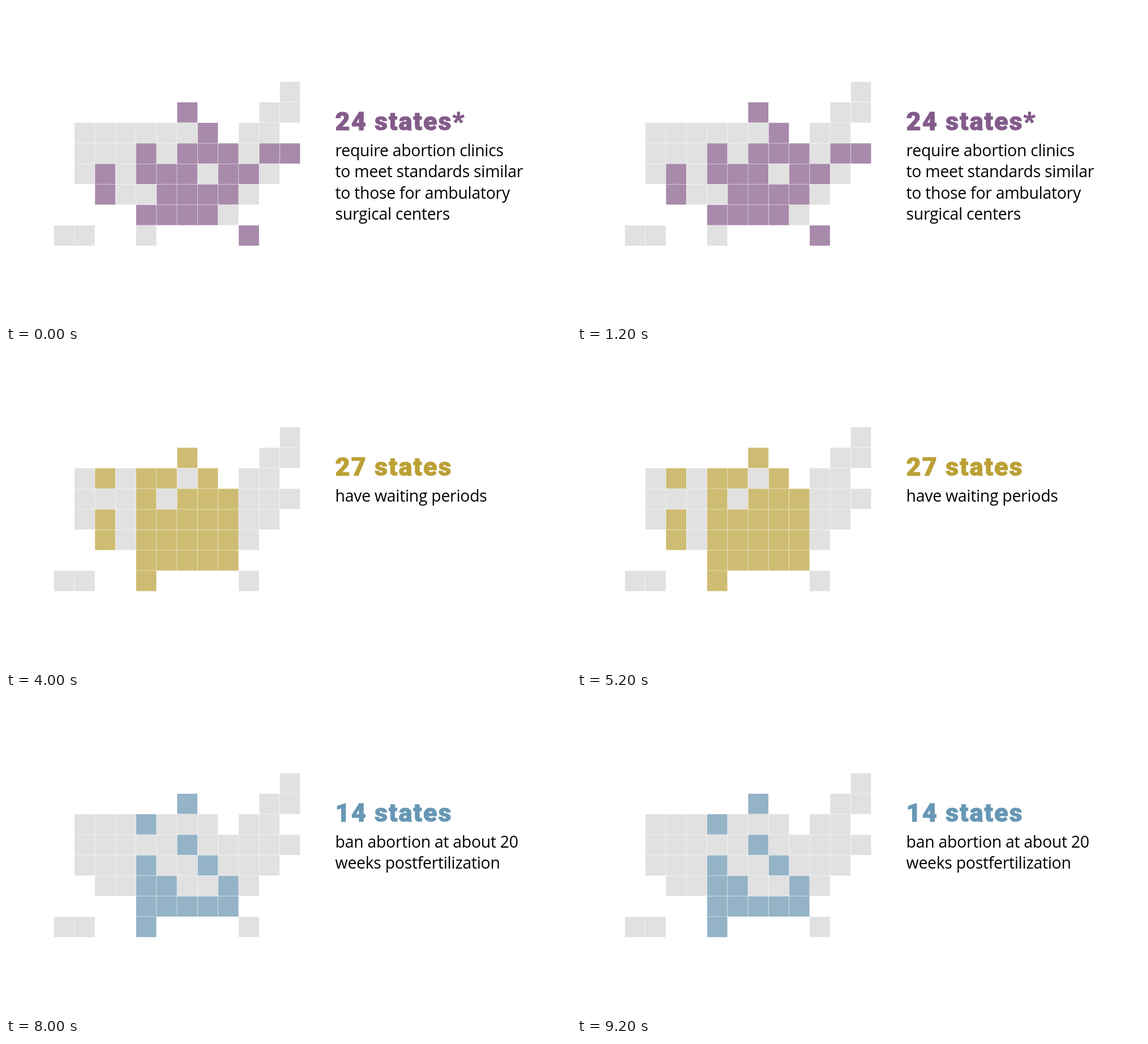
Animation, 998 px wide and 561 px high, one loop 10 s. Source, as an HTML page with a canvas:

```html
<!DOCTYPE html>
<html lang="en">
<head>
<meta charset="utf-8">
<title>State map</title>
<style>
  html, body { margin: 0; width: 100%; height: 100%; overflow: hidden; background: #fff; }
  canvas, svg { position: absolute; left: 0; top: 0; width: 998px; height: 561px; }
  .head { font: 900 45px Roboto, "Liberation Sans", sans-serif; letter-spacing: 2px; stroke-width: 1px; }
  .body { font: 400 28.4px "Open Sans", "Noto Sans", sans-serif; letter-spacing: -0.28px; fill: #000; }
</style>
</head>
<body>
<canvas id="map" width="998" height="561"></canvas>
<svg id="copy" viewBox="0 0 998 561"></svg>
<script>
const HOLD = 2000;
const LEFT = 84.75, TOP = 133.7, PITCH_X = 36.27, PITCH_Y = 36.2, TILE = 35.7;
const TEXT_X = 581.6, HEAD_Y = 219, BODY_Y = 265, LEADING = 37.4;

// Column spans, with rows separated by "/".
const country = '11/6 10-11/1-7 9-10/1-11/1-10/2-9/4-8/0-1 4 9';

// "rise" lifts the map by 1 px and the text by 1.5 px.
const scenes = [
  { tile: '#a88aab', ink: '#835b8a', title: '24 states*',
    lit: '/6/7/4 6-8 10-11/2 4-6 8-9/2 5-8/4-7/9',
    lines: ['require abortion clinics', 'to meet standards similar', 'to those for ambulatory', 'surgical centers'] },
  { tile: '#9aafa0', ink: '#6e917b', title: '4 states*',
    lit: '//4//2 5/6',
    lines: ['require abortion doctors', 'to have admitting', 'privileges at local', 'hospitals'] },
  { tile: '#cebc72', ink: '#bba035', title: '27 states', rise: 1,
    lit: '/6/2 4-5 7/4 6-8/2 4-8/2 4-8/4-8/4',
    lines: ['have waiting periods'] },
  { tile: '#c79f84', ink: '#b37850', title: '10 states', rise: 1,
    lit: '//2 4 7/6/2 4-6/4/4',
    lines: ['restrict health insurance', 'coverage for abortions'] },
  { tile: '#94b3c7', ink: '#6797b4', title: '14 states', rise: 1,
    lit: '/6/4/6/4 7/4-5 8/4-8/4',
    lines: ['ban abortion at about 20', 'weeks postfertilization'] }
];

const ctx = document.getElementById('map').getContext('2d');
const copy = document.getElementById('copy');

function drawTiles(spans, color, top) {
  ctx.fillStyle = color;
  spans.split('/').forEach((row, r) => {
    for (const span of row.split(' ').filter(Boolean)) {
      const [from, to = from] = span.split('-').map(Number);
      for (let c = from; c <= to; c++) {
        const x = LEFT + c * PITCH_X, y = top + r * PITCH_Y;
        ctx.clearRect(Math.floor(x), Math.floor(y), 37, 37);
        ctx.fillRect(x, y, TILE, TILE);
      }
    }
  });
}

// The country without the lit tiles, so that no edge is painted twice.
function drawMap(scene, top) {
  ctx.clearRect(0, 0, 998, 561);
  const cells = spans => spans.split('/').map(row => row.split(' ').filter(Boolean).flatMap(span => {
    const [from, to = from] = span.split('-').map(Number);
    return Array.from({ length: to - from + 1 }, (_, i) => from + i);
  }));
  const lit = cells(scene.lit);
  cells(country).forEach((row, r) => row.forEach(c => {
    ctx.fillStyle = lit[r]?.includes(c) ? scene.tile : '#e1e1e1';
    ctx.fillRect(LEFT + c * PITCH_X, top + r * PITCH_Y, TILE, TILE);
  }));
}

function addText(str, cls, y, color) {
  const el = document.createElementNS('http://www.w3.org/2000/svg', 'text');
  el.setAttribute('class', cls);
  el.setAttribute('x', TEXT_X);
  el.setAttribute('y', y);
  if (color) {
    el.setAttribute('fill', color);
    el.setAttribute('stroke', color);
  }
  el.textContent = str;
  copy.append(el);
}

function drawScene(scene) {
  const rise = scene.rise || 0;
  drawMap(scene, TOP - rise);
  copy.replaceChildren();
  addText(scene.title, 'head', HEAD_Y - 1.5 * rise, scene.ink);
  scene.lines.forEach((line, i) => addText(line, 'body', BODY_Y - 1.5 * rise + i * LEADING));
}

let shown = -1;
function tick() {
  const index = Math.floor(performance.now() / HOLD) % scenes.length;
  if (index !== shown) drawScene(scenes[shown = index]);
  requestAnimationFrame(tick);
}
tick();
</script>
</body>
</html>
```
